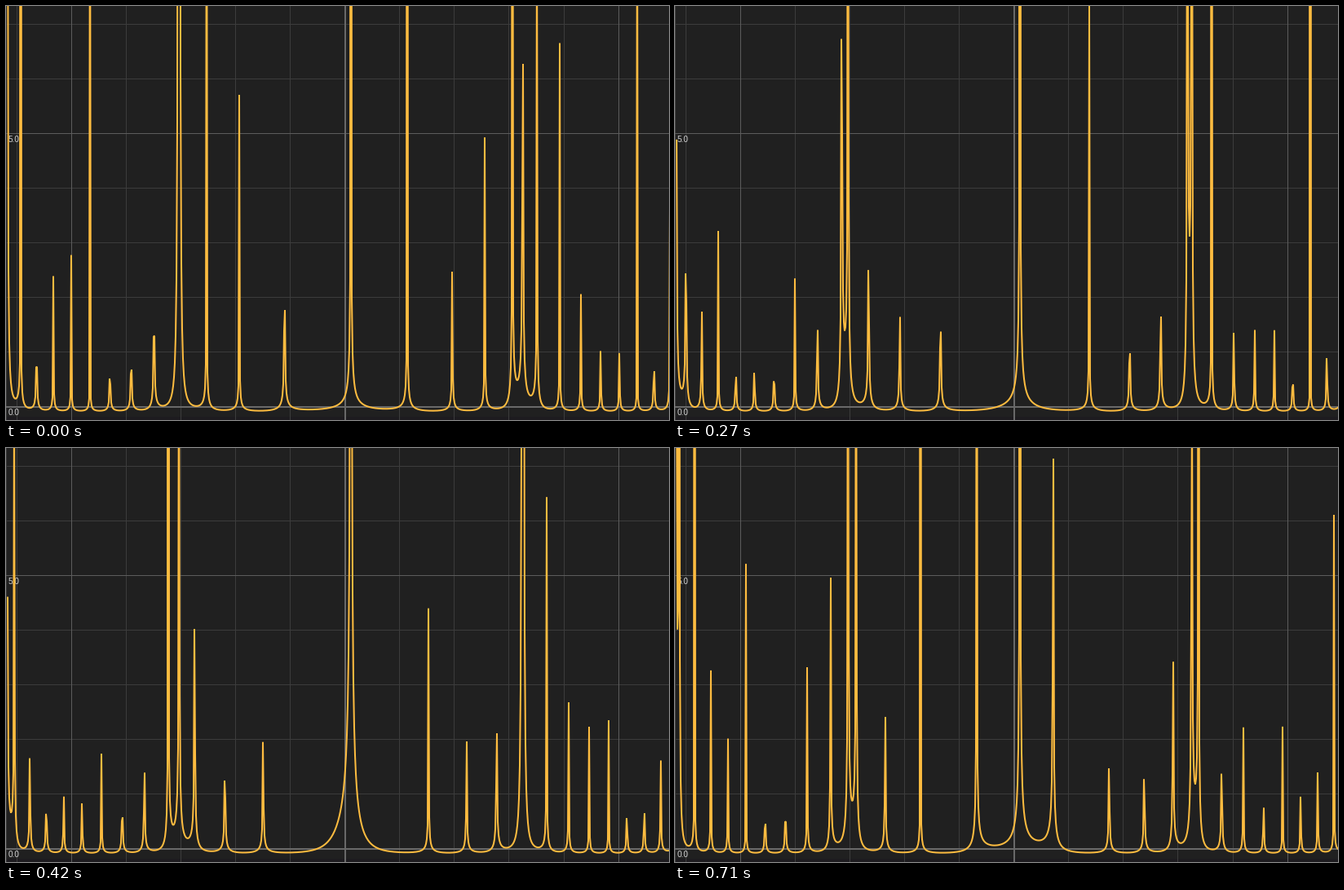
These frames come from a looping animation (813x508 px, 730 ms). A matplotlib script:

```python
import numpy as np
import matplotlib.pyplot as plt
from matplotlib.animation import FuncAnimation
from matplotlib.patches import Rectangle

W, H, DPI = 813, 508, 64
PT = 72 / DPI                      # points per pixel
ORIGIN_X, ORIGIN_Y, UNIT = 416.225, 492.2, 67.07

BACK, STRIP = "#202020", "#1d1b1f"
MINOR, MAJOR, AXIS = "#3c3c3c", "#5c5c5c", "#696969"
CURVE, LABEL = "#fdbc40", "#d2d2d2"

TICK = 10                          # ms per animation frame
HOLDS = [150, 120, 150, 140, 150, 20]
STEPS = [0, 7, 15, 26, 33, 43]     # simulation steps reached at each hold
ENDS = np.cumsum(HOLDS)

fig = plt.figure(figsize=(W / DPI, H / DPI), dpi=DPI, facecolor=BACK)
ax = fig.add_axes([0, 0, 1, 1])
ax.set_xlim(0, W)
ax.set_ylim(H, 0)
ax.axis("off")


def box(x, y, w, h, color, z):
    ax.add_patch(Rectangle((x, y), w, h, fc=color, lw=0, zorder=z))


def style(n):
    """Colour, thickness and layer of the grid line at integer n."""
    if n == 0:
        return AXIS, 2, 3
    return (MAJOR, 1, 2) if n % 5 == 0 else (MINOR, 1, 1)


box(0, 504, W, 4, STRIP, 0)
box(0, 0, 1, H, MINOR, 1)
for n in range(-6, 6):
    color, size, z = style(n)
    box(round(ORIGIN_X + n * UNIT) - 1, 0, size, H, color, z)
for n in range(0, 8):
    color, size, z = style(n)
    box(0, round(ORIGIN_Y - n * UNIT) - 1, W, size, color, z)

for text, base in (("5.0", 167), ("0.0", 502)):
    ax.text(3, base, text, color=LABEL, family="Liberation Sans",
            size=10 * PT, va="baseline", ha="left", zorder=4)

# One sample per pixel column, so the spikes are cut at varying heights.
px = np.arange(2, W + 2)
x = (px - ORIGIN_X) / UNIT
wave = x**2 + np.sin(0.8 * (x - 2))

curve, = ax.plot([], [], color=CURVE, lw=2 * PT, zorder=5,
                 solid_joinstyle="bevel", solid_capstyle="butt")


def height(t):
    den = 30 * np.abs(np.sin(x - 0.1) * np.sin(wave - t))
    return 1 / np.maximum(den, 1e-3) - 0.1


def draw(i):
    k = np.searchsorted(ENDS, (i * TICK) % ENDS[-1], side="right")
    t = 0.6336 + 0.05 * STEPS[k]
    curve.set_data(px, ORIGIN_Y - UNIT * height(t))
    return curve,


anim = FuncAnimation(fig, draw, frames=int(ENDS[-1]) // TICK, interval=TICK,
                     init_func=lambda: draw(0), repeat=True, repeat_delay=0)
plt.show()
```
